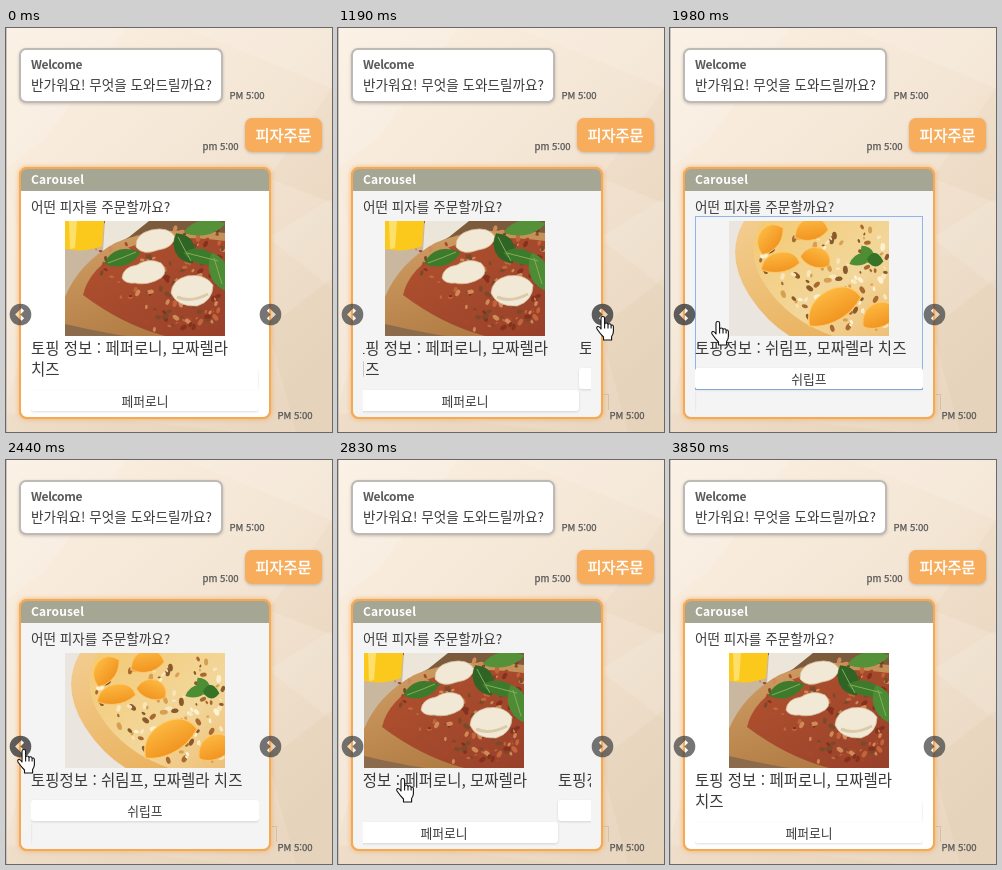
An HTML page for the animation above (3.99 s loop, 326x404 px).

```html
<!DOCTYPE html>
<html lang="ko">
<head>
<meta charset="utf-8">
<title>Pizza chat</title>
<style>
html, body { margin: 0; width: 100%; height: 100%; overflow: hidden; }
svg { display: block; width: 326px; height: 404px; }
text { font-family: "Noto Sans CJK KR", "Noto Sans KR", "Noto Sans", sans-serif; fill: #3a3a3a; white-space: pre; }
.msg { font-size: 13.6px; }
.time { font-size: 9.6px; fill: #555; stroke: #555; stroke-width: .25px; }
.head { font-size: 12px; font-weight: 700; fill: #5a5a5a; letter-spacing: -.4px; }
.title { fill: #fff; letter-spacing: .15px; }
.order { font-size: 15.2px; fill: #fff; stroke: #fff; stroke-width: .5px; }
.name { font-size: 15.5px; }
.pick { font-size: 12.8px; text-anchor: middle; }
.button { fill: #fff; filter: drop-shadow(0 1px 1px rgba(0, 0, 0, .13)); }
.bubble { filter: drop-shadow(0 1px 1.5px rgba(0, 0, 0, .2)); }
.glow { filter: drop-shadow(0 0 2.5px rgba(246, 160, 70, .75)); }
.focus { fill: none; stroke: #8fb6ec; }
</style>
</head>
<body>
<svg viewBox="0 0 326 404">
  <defs>
    <linearGradient id="paper" x1="0" y1="0" x2=".75" y2="1">
      <stop offset="0" stop-color="#fbf0e3"/>
      <stop offset=".45" stop-color="#f5e7d6"/>
      <stop offset="1" stop-color="#e9d7c1"/>
    </linearGradient>
    <linearGradient id="crust" x1="0" y1="0" x2=".5" y2="1">
      <stop offset="0" stop-color="#d3a066"/>
      <stop offset="1" stop-color="#b07c44"/>
    </linearGradient>
    <linearGradient id="sauce" x1="0" y1="0" x2="1" y2="1">
      <stop offset="0" stop-color="#b3532f"/>
      <stop offset="1" stop-color="#97402a"/>
    </linearGradient>
    <linearGradient id="rim" x1="0" y1="0" x2=".5" y2="1">
      <stop offset="0" stop-color="#f3cd90"/>
      <stop offset="1" stop-color="#e9b25f"/>
    </linearGradient>
    <linearGradient id="cheese" x1="0" y1="0" x2="1" y2="1">
      <stop offset="0" stop-color="#f4c972"/>
      <stop offset=".6" stop-color="#f2d79b"/>
      <stop offset="1" stop-color="#eec078"/>
    </linearGradient>
    <linearGradient id="fruit" x1="0" y1="0" x2="0" y2="1">
      <stop offset="0" stop-color="#fcb840"/>
      <stop offset="1" stop-color="#f19420"/>
    </linearGradient>
    <clipPath id="window"><rect x="25" y="186" width="228" height="202"/></clipPath>
    <clipPath id="photo"><rect width="160" height="115"/></clipPath>
    <mask id="notch" maskUnits="userSpaceOnUse" x="-12" y="-12" width="24" height="24">
      <rect x="-12" y="-12" width="24" height="24" fill="#fff"/>
      <path d="M2.3-5-2.7 0 2.3 5" fill="none" stroke="#000" stroke-width="3.8"/>
    </mask>
    <path id="leaf" d="M-16 0Q-8-11 4-8 12-5 17 0 10 8 0 8-10 7-16 0Z"/>
    <path id="wedge" d="M-17 4Q-13-12 2-12 15-11 17 3 8 11-3 10-12 9-17 4Z"/>
  </defs>

  <rect width="326" height="404" fill="url(#paper)"/>
  <g fill="#fff" opacity=".12">
    <path d="M0 0H120L40 110 0 140Z"/>
    <path d="M180 0 326 60V0Z"/>
    <path d="M0 150 14 210V330L0 380Z"/>
    <path d="M262 210 326 170V260Z"/>
  </g>
  <g fill="#c79c68" opacity=".06">
    <path d="M326 60V175L262 150Z"/>
    <path d="M262 300 326 250V404H290Z"/>
    <path d="M0 385 120 392 230 404H0Z"/>
  </g>
  <path d="M.5 0V404" stroke="#c9c3ba"/>

  <rect class="bubble" x="14" y="21" width="202" height="53" rx="6" fill="#fff" stroke="#bdbab5" stroke-width="2"/>
  <text class="head" x="25" y="41">Welcome</text>
  <text class="msg" x="25" y="62.3">반가워요! 무엇을 도와드릴까요?</text>
  <text class="time" x="223.5" y="71">PM 5:00</text>

  <text class="time" x="196.5" y="121.5">pm 5:00</text>
  <rect class="bubble" x="239" y="90" width="77" height="34" rx="7" fill="#f7ad5c"/>
  <text class="order" x="249.5" y="113">피자주문</text>

  <rect class="glow" x="14" y="140" width="250" height="250" rx="7" fill="#f6a955" stroke="#f6a955" stroke-width="2"/>
  <rect id="card" x="14" y="140" width="250" height="250" rx="7" fill="#fff"/>
  <path d="M15 163V146Q15 141 20 141H258Q263 141 263 146V163Z" fill="#a5a694"/>
  <rect x="14" y="140" width="250" height="250" rx="7" fill="none" stroke="#f6a955" stroke-width="2"/>
  <text class="head title" x="25" y="156">Carousel</text>
  <text class="msg" x="25" y="183.5">어떤 피자를 주문할까요?</text>
  <text class="time" x="271.5" y="390.7">PM 5:00</text>
  <path id="edge" d="M266 366.5H270.5V382" fill="none" stroke="#000" stroke-opacity=".1"/>

  <g clip-path="url(#window)">
    <g id="track">
      <g>
        <rect class="focus" x="25.5" y="188.5" width="227" height="194"/>
        <g transform="translate(59 193)" clip-path="url(#photo)">
          <rect width="160" height="115" fill="#c9b7a0"/>
          <path d="M38 0H160V30H60Z" fill="#7c5a3c"/>
          <path d="M40 0H84L64 16 38 30Z" fill="#ece5da"/>
          <path d="M0 0H39L37 25Q20 32 0 28Z" fill="#fbc81c"/>
          <path d="M4 0H12L10 27 5 28Z" fill="#fde06a"/>
          <path d="M0 76Q14 42 50 22 92 4 160 12V115H0Z" fill="url(#crust)"/>
          <path d="M18 74Q24 47 60 28 98 11 160 20V115H100Q58 104 18 74Z" fill="url(#sauce)"/>
          <path d="M0 103Q40 112 62 115H0Z" fill="#8b6b4b"/>
          <g id="herbs"></g>
          <g fill="#f1e8d6" stroke="#d6bd98" stroke-width=".8">
            <path d="M71 26Q70 13 86 9 104 5 110 16 108 27 93 29 78 35 71 26Z"/>
            <path d="M57 57Q58 46 72 44 84 36 96 42 104 50 96 57 83 65 70 62 60 63 57 57Z"/>
            <path d="M106 72Q107 59 122 55 140 52 148 64 148 80 132 85 112 86 106 72Z"/>
          </g>
          <path d="M112 76Q126 82 143 73" fill="none" stroke="#dccbaa" stroke-width="3"/>
          <g fill="#3d7a2b">
            <use href="#leaf" transform="translate(57 37) rotate(-18) scale(1.15 1)"/>
            <use href="#leaf" transform="translate(119 27) rotate(62) scale(1.05 1.2)" fill="#2f6424"/>
            <use href="#leaf" transform="translate(137 36) rotate(12) scale(1.2 .9)"/>
            <use href="#leaf" transform="translate(153 50) rotate(72) scale(1.2 1.1)" fill="#4d8b35"/>
            <use href="#leaf" transform="translate(139 7) rotate(-12) scale(1.3 .9)" fill="#549139"/>
          </g>
          <path d="M43 42Q57 37 71 31M113 16Q118 26 126 40M122 32 153 40M149 37 157 63" fill="none" stroke="#83ae5b"/>
        </g>
        <text class="name" x="25" y="325.7">토핑 정보 : 페퍼로니, 모짜렐라</text>
        <text class="name" x="25" y="347.2">치즈</text>
        <rect class="button" x="25" y="362" width="228" height="21" rx="3"/>
        <text class="pick" x="139" y="377.8">페퍼로니</text>
      </g>
      <g transform="translate(228)">
        <rect class="focus" x="25.5" y="188.5" width="227" height="173"/>
        <g transform="translate(59 193)" clip-path="url(#photo)">
          <rect width="160" height="115" fill="#ebe5e0"/>
          <path d="M15 0Q-5 34 20 74 42 108 74 122H160V0Z" fill="url(#rim)"/>
          <path d="M34 0Q14 30 36 64 60 100 104 115H160V0Z" fill="url(#cheese)"/>
          <g id="nuts"></g>
          <g fill="url(#fruit)" stroke="#ffcb6e" stroke-width=".8">
            <use href="#wedge" transform="translate(41 18) rotate(-50)"/>
            <use href="#wedge" transform="translate(82 9) rotate(-10)"/>
            <use href="#wedge" transform="translate(51 42) rotate(-8) scale(1.15 .9)"/>
            <use href="#wedge" transform="translate(87 37) rotate(20) scale(.9)"/>
            <use href="#wedge" transform="translate(104 86) rotate(-28) scale(1.75 1.4)"/>
            <use href="#wedge" transform="translate(150 95) rotate(-20) scale(1.1)"/>
          </g>
          <g fill="#4d8d34">
            <use href="#leaf" transform="translate(133 38) rotate(-22) scale(.85 .7)"/>
            <use href="#leaf" transform="translate(139 34) rotate(55) scale(.7)"/>
            <use href="#leaf" transform="translate(146 39) rotate(8) scale(.5 .8)" fill="#367327"/>
          </g>
        </g>
        <text class="name" x="25" y="325.7">토핑정보 : 쉬림프, 모짜렐라 치즈</text>
        <rect class="button" x="25" y="340" width="228" height="21" rx="3"/>
        <text class="pick" x="139" y="355.8">쉬립프</text>
      </g>
    </g>
  </g>

  <g fill="#474747">
    <g id="prev" transform="translate(14.5 286.5)"><circle r="10.8" mask="url(#notch)"/></g>
    <g id="next" transform="translate(264.5 286.5) scale(-1 1)"><circle r="10.8" mask="url(#notch)"/></g>
  </g>
  <path id="hand" fill="#fff" stroke="#111" stroke-width="1.1" stroke-linejoin="round"
    d="M5 13V2.3a1.8 1.8 0 0 1 3.6 0V8.5Q8.8 7 10.3 7T12 8.8Q12.3 7.8 13.6 7.8T15.1 9.5Q15.5 8.8 16.4 9T17.4 10.8V15.5Q17.4 18 15.6 20.5V24H7.5V21Q4 17.5 1 13 .2 11.2 1.7 10.6T5 13ZM8.6 8.5V12.5M12 8.8V12.5M15.1 9.5V12.5"/>
</svg>
<script>
const LOOP = 3990, TICK = 77.8, FIRST = 334, WIDTH = 228;
const $ = id => document.getElementById(id);
const parts = Object.fromEntries(
  ['card', 'edge', 'track', 'prev', 'next', 'hand'].map(id => [id, $(id)]));
const rings = document.querySelectorAll('.focus');

// [time, x, y] of the pointer
const path = [
  [330, 212, 360], [568, 258, 292], [640, 258, 292], [720, 258, 288],
  [1660, 258, 288], [1810, 196, 290], [1968, 41, 293], [2200, 8, 294],
  [2279, 6, 292], [2434, 11, 289], [2670, 11, 289], [2825, 58, 318], [3057, 200, 400]
];

function rng(seed) {
  return () => (seed = (seed * 16807) % 2147483647) / 2147483647;
}

function scatter(id, count, size, colors, seed) {
  const rand = rng(seed);
  for (let i = 0; i < count; i++) {
    const e = document.createElementNS('http://www.w3.org/2000/svg', 'ellipse');
    const x = 30 + rand() * 128, y = 6 + rand() * 104;
    const inside = y < 24 + x * .95 && y > 36 - x * .3;
    const r = size * (.5 + rand());
    const attrs = {
      rx: r, ry: r * .6, fill: colors[i % colors.length],
      transform: `translate(${x} ${y}) rotate(${rand() * 180})`
    };
    for (const k in attrs) e.setAttribute(k, attrs[k]);
    if (inside) $(id).append(e);
  }
}

// CSS "ease": cubic-bezier(.25, .1, .25, 1)
function ease(p) {
  if (p <= 0) return 0;
  if (p >= 1) return 1;
  let lo = 0, hi = 1, s = .5;
  for (let i = 0; i < 24; i++) {
    s = (lo + hi) / 2;
    if (.75 * s * (1 - s) + s ** 3 < p) lo = s; else hi = s;
  }
  return .3 * s * (1 - s) ** 2 + 3 * s * s * (1 - s) + s ** 3;
}

function pointer(t) {
  const i = path.findIndex(p => p[0] > t);
  if (i < 0) return path[path.length - 1].slice(1);
  const [t0, x0, y0] = path[Math.max(0, i - 1)], [t1, x1, y1] = path[i];
  const k = t1 > t0 ? (t - t0) / (t1 - t0) : 0;
  return [x0 + (x1 - x0) * k, y0 + (y1 - y0) * k].map(Math.round);
}

function draw(t) {
  const during = (a, b) => t >= a && t < b;
  const step = FIRST + Math.floor((t - FIRST) / TICK) * TICK;
  const shift = ease((step - 1156) / 500) - ease((step - 2543) / 500);
  const [x, y] = pointer(step);

  parts.track.setAttribute('transform', `translate(${Math.round(-WIDTH * shift)})`);
  parts.hand.setAttribute('transform', `translate(${x} ${y})`);
  parts.hand.style.display = during(338, 3136) ? '' : 'none';
  parts.card.setAttribute('fill', during(338, 3056) ? '#f4f4f4' : '#fff');
  parts.edge.style.display = t >= 338 ? '' : 'none';
  parts.next.style.opacity = during(1040, 1818) ? .87 : .75;
  parts.prev.style.opacity = during(1968, 2745) ? .87 : .75;
  rings[0].style.display = during(3056, 3850) ? '' : 'none';
  rings[1].style.display = during(1738, 2280) ? '' : 'none';
}

scatter('herbs', 230, 2.6, ['#c2643c', '#86301d', '#cf8a58', '#a8482b', '#7a4a2a'], 7);
scatter('nuts', 150, 2.8, ['#a8692f', '#f9e6bd', '#8a5a2c', '#fff1d0', '#d79f52'], 23);

const start = performance.now();
function frame() {
  draw((performance.now() - start) % LOOP);
  requestAnimationFrame(frame);
}
frame();
</script>
</body>
</html>
```
